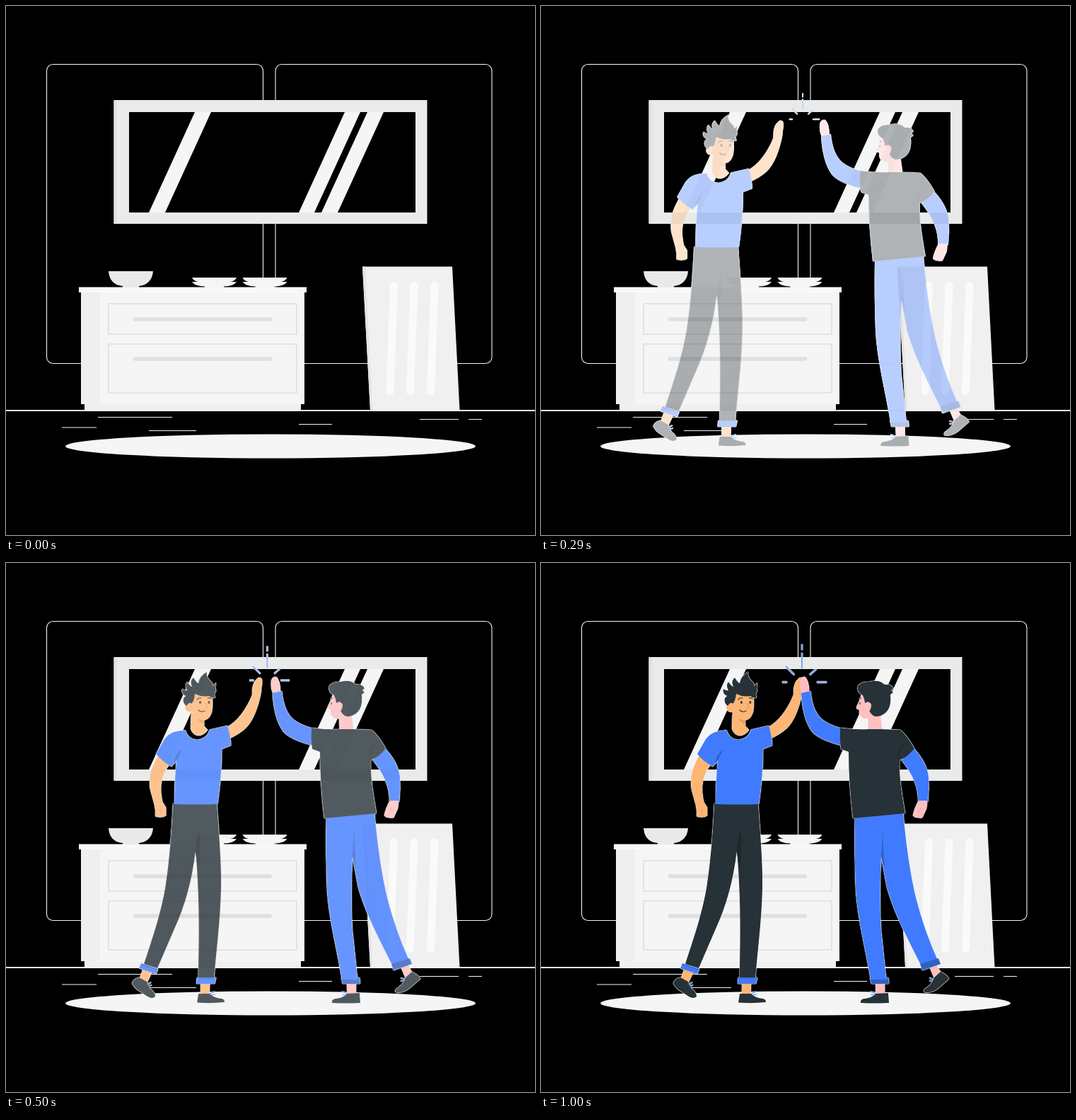
Recreate the animation shown at these times as an HTML page with a canvas. Size 748x748 px, loop 1040 ms.

```html
<!DOCTYPE html>
<html lang="en">
<head>
<meta charset="utf-8">
<title>High five</title>
<style>
html, body { margin: 0; width: 100%; height: 100%; overflow: hidden; background: #000; }
canvas { display: block; }
</style>
</head>
<body>
<canvas id="stage" width="748" height="748"></canvas>
<script>
const SIZE = 748, LOOP = 1040, FPS = 24, SLIDE = 45;
const BLUE = '#407bff', BLUE_DARK = '#315fc4', INK = '#263238', INK_DARK = '#1d272c';
const TAN = '#ffb573', TAN_DARK = '#e8975a', PINK = '#ffbfbf', PINK_DARK = '#f0a3a3';

const stage = document.getElementById('stage').getContext('2d');

function layer() {
  const c = document.createElement('canvas');
  c.width = c.height = SIZE;
  return c.getContext('2d');
}

function fill(g, color, d) {
  g.fillStyle = color;
  g.fill(new Path2D(d));
}

function line(g, color, width, d, cap = 'butt') {
  g.strokeStyle = color;
  g.lineWidth = width;
  g.lineCap = cap;
  g.stroke(new Path2D(d));
}

function box(g, color, x1, y1, x2, y2) {
  g.fillStyle = color;
  g.fillRect(x1, y1, x2 - x1, y2 - y1);
}

function drawRoom(g, wall) {
  box(g, wall, 0, 0, SIZE, SIZE);
  for (const x of [57.5, 381]) {
    g.beginPath();
    g.roundRect(x, 82.5, 306, 423, 9);
    g.strokeStyle = '#f4f4f4';
    g.lineWidth = 1.1;
    g.stroke();
  }

  // mirror
  box(g, '#e9eaea', 152.5, 133, 595.5, 308);
  box(g, '#e1e3e2', 152.5, 134, 157, 307);
  box(g, wall, 174, 150, 579, 292);
  for (const [x, w] of [[267, 23], [479, 22], [511, 23]])
    fill(g, '#f5f5f5', `M${x} 150h${w}l-65 142h-${w}z`);

  // bin
  fill(g, '#f0f0f0', 'M504 368.5H631L641.5 572H515z');
  fill(g, '#e4e4e4', 'M504 368.5h4L518 572h-3z');
  for (const x of [548.5, 577, 606])
    line(g, '#fafafa', 11, `M${x} 395l-5.5 150`, 'round');

  // floor
  line(g, '#f5f5f5', 2, 'M0 572H748');
  line(g, '#f5f5f5', 1.2, 'M130 581.5H235M79 596H128M202 600.5H269M414 591.5H461M585 584.5H640M654 584.5H673');
  fill(g, '#f5f5f5', 'M84 622.5a290 17 0 0 1 580 0a290 17 0 0 1 -580 0');

  // cabinet
  box(g, '#f0f0f0', 111, 563, 417, 572);
  box(g, '#f5f5f5', 106, 405, 422, 563);
  box(g, '#efefef', 106, 405, 133, 563);
  box(g, '#f8f8f8', 103, 397.5, 425, 405);
  line(g, '#e0e0e0', 1.7, 'M145 421H411V464H145zM145 478H411V547H145z');
  line(g, '#e0e0e0', 5.5, 'M182.5 443H373.5M182.5 499H373.5', 'round');

  // dishes
  fill(g, '#e8eae9', 'M145 375H208C207 388 199 395 188 396V398H165V396C153 395 146 388 145 375z');
  for (const x of [263, 334.5])
    fill(g, '#f5f5f5', `M${x} 384h63q-2 5 -9 6h9q-4 6 -18 6.5v1.5h-27v-1.5q-14 -.5 -18 -6.5h9q-7 -1 -9 -6z`);
}

function drawLeftMan(g) {
  // feet
  fill(g, TAN, 'M203 573L198 587L208 594L215 579z');
  fill(g, INK, 'M197 586Q190 587 187 594Q190 601 197 605L209 613Q216 617 220 613Q220 607 213 602L208 592z');
  fill(g, TAN, 'M284 594H297L296 611H284z');
  fill(g, INK, 'M281 609H297Q303 615 314 616Q318 617 318 621Q300 623 279 621.5z');
  line(g, BLUE, 1.2, 'M297 609l7 -3M299 611l6 -1M208 596l6 -3M210 598l5 -1');
  // trousers
  fill(g, INK, 'M245 340H307C310 380 314 430 313 460C312 505 306 550 303 588H281C281 545 284 490 277 406C272 450 261 487 248 515Q235 545 223 573L204 567C214 536 229 494 235 453C240 420 243 380 245 340z');
  fill(g, INK_DARK, 'M282 376L276 405L281 433Q285 400 282 376z');
  fill(g, BLUE, 'M200 566L224 574L221 581L197 573zM279 586H306L304 595H278z');
  line(g, BLUE_DARK, 1, 'M200 567L223 575M280 587H305');
  // arms
  fill(g, TAN, 'M224 272C213 292 211 302 213 320L219 342Q221 350 220 358Q229 361 235 357L235 346L230 338C226 318 227 303 239 286z');
  line(g, TAN_DARK, 1, 'M228 348v7');
  fill(g, TAN, 'M320 233C336 225 349 207 357 187Q357 172 361 167L366 162Q371 161 371 168L369 185C365 204 358 224 347 234Q338 242 323 249z');
  // neck and shirt
  fill(g, BLUE, 'M264 236.5C248 237 240 240 233 249L221 270Q230 281 243 288L250 278Q247 312 247 341Q280 342 308 341Q314 300 314 263L327 258Q326 242 322 230L296 236Q280 248 264 236.5z');
  fill(g, BLUE_DARK, 'M258 263Q248 270 246 285L250 279z');
  g.globalCompositeOperation = 'destination-out';
  fill(g, '#000', 'M262 235Q266 250 280 250Q294 248 297 235z');
  g.globalCompositeOperation = 'source-over';
  fill(g, TAN, 'M271 211L270 234Q273 243 281 244Q289 243 294 236L289 231V218z');
  fill(g, TAN_DARK, 'M278 217Q283 223 289 223V227Q281 226 278 217z');
  // head
  fill(g, TAN, 'M271 183H299Q302 195 300 209Q297 222 287 222Q276 221 272 210Q263 212 262 204Q263 198 271 199z');
  fill(g, INK, 'M264 202Q258 198 260 191L263 188Q256 185 258 178Q262 181 265 180Q261 173 265 168Q269 174 272 175Q268 167 274 162Q278 169 281 170Q282 160 293 154Q291 160 298 167Q302 170 301 174L306 169Q304 176 306 181Q302 185 305 190Q300 192 296 188Q286 190 276 185Q275 195 271 199Q268 196 264 202z');
  fill(g, INK, 'M282 197a1.4 2 0 1 0 2.8 0a1.4 2 0 1 0 -2.8 0zM294.5 197a1.4 2 0 1 0 2.8 0a1.4 2 0 1 0 -2.8 0z');
  line(g, INK, 1.1, 'M279 193q3 -3 6 -2M294 191q3 -1 5 1M281 208q4 4 9 1', 'round');
  line(g, TAN_DARK, 1.2, 'M291 198q4 6 1 8h-2');
}

function drawRightMan(g) {
  // feet
  fill(g, PINK, 'M473 594H486V611H474z');
  fill(g, INK, 'M491 608L492 622Q470 623 452 622Q451 617 457 616Q468 615 473 609z');
  fill(g, PINK, 'M549 570L558 566L567 582L557 589z');
  fill(g, INK, 'M565 578Q574 582 577 588L562 601Q552 609 542 607Q540 603 546 600Q554 594 555 587z');
  line(g, BLUE, 1.2, 'M474 609l-8 -3M473 611l-7 -1M556 588l-7 -1M555 590l-6 1');
  // trousers
  fill(g, BLUE, 'M444 358L512 352C515 385 520 430 530 473Q542 520 561 562L538 570C522 538 499 495 489 458L481 415C479 450 479 505 482 530L488 588H466C459 545 447 500 445 460Q443 410 444 358z');
  fill(g, BLUE_DARK, 'M484 376L481 415L486 432Q483 400 484 376z');
  fill(g, BLUE_DARK, 'M536 567L562 559L565 567L539 576zM465 586H491L492 595H467z');
  line(g, BLUE, 3, 'M466 587.5H490');
  // arms
  fill(g, BLUE, 'M526 261Q546 282 548 303Q549 320 547 338H533Q535 310 510 279z');
  fill(g, PINK, 'M534 336H546L545 347L539 360Q530 361 526 357Q528 347 534 336z');
  line(g, PINK_DARK, 1, 'M537 346l-4 8');
  fill(g, PINK, 'M366 167Q368 160 373 161Q379 166 379 183L370 187Q365 178 366 167z');
  fill(g, BLUE, 'M368 184L381 181C383 200 388 213 397 221Q407 229 425 234V258Q393 250 383 238Q370 220 368 184z');
  // neck and shirt
  fill(g, PINK, 'M462 212L463 239H483L479 210z');
  fill(g, INK, 'M423 233Q445 236 463 235H481L508 236Q517 243 528 262Q519 274 507 279C506 305 511 330 515 354L441 361Q435 310 435 267L424 263Q422 248 423 233z');
  line(g, INK_DARK, 1.2, 'M513 255Q505 263 505 280');
  // head
  fill(g, PINK, 'M454 183Q451 195 446 204Q446 207 450 207Q449 218 457 220Q470 221 475 210V182z');
  fill(g, INK, 'M455 187Q446 183 448 174Q453 167 464 168Q478 164 486 172Q495 171 498 177L495 180L498 183L494 186Q496 204 487 212Q478 219 470 216Q463 211 463 203L458 197Q457 191 455 187z');
  fill(g, PINK, 'M467 200Q462 193 458 199Q457 208 463 210Q467 208 467 200z');
  line(g, INK, 1.2, 'M450 192l3 -1M451 197v3');
}

function drawRays(g) {
  line(g, '#739eff', 1.9, 'M369 115V123M369 127V149M346 146L358 158M389 150L380 158M341 168.5H348M390 168.5H404');
}

function sprite(draw) {
  const g = layer();
  draw(g);
  return g.canvas;
}

const darkRoom = sprite(g => drawRoom(g, '#000'));
const lightRoom = sprite(g => drawRoom(g, '#fff'));
const leftMan = sprite(drawLeftMan);
const rightMan = sprite(drawRightMan);
const rays = sprite(drawRays);
const world = layer(), mask = layer();

const bezier = (s, a, b) => 3 * (1 - s) ** 2 * s * a + 3 * (1 - s) * s * s * b + s ** 3;

// cubic-bezier(.36, -.01, .5, 1.38)
function ease(p) {
  let lo = 0, hi = 1;
  for (let i = 0; i < 24; i++) {
    const mid = (lo + hi) / 2;
    if (bezier(mid, 0.36, 0.5) < p) lo = mid; else hi = mid;
  }
  return bezier(hi, -0.01, 1.38);
}

function drawActors(g, v, dx = 0, dy = 0) {
  const scale = 0.5 + 0.5 * v, slide = SLIDE * (v - 1);
  g.drawImage(leftMan, slide + dx, dy);
  g.drawImage(rightMan, dx - slide, dy);
  g.save();
  g.translate(372.5 + dx, 142 + dy);
  g.scale(scale, scale);
  g.drawImage(rays, -372.5, -142);
  g.restore();
}

function render(ms) {
  // pictures start on 10 ms ticks, 24 a second
  const step = Math.floor((Math.floor(ms / 10) * 10 + 5) * FPS / 1000);
  const v = step ? ease(Math.min(1, (step + 0.75) / FPS)) : 0;
  stage.drawImage(darkRoom, 0, 0);
  if (v <= 0) return;

  // the actors fade over a white room, seen only inside their outlines
  world.globalAlpha = 1;
  world.drawImage(lightRoom, 0, 0);
  world.globalAlpha = Math.min(1, v);
  drawActors(world, v);

  mask.globalCompositeOperation = 'source-over';
  mask.clearRect(0, 0, SIZE, SIZE);
  for (const [dx, dy] of [[0.4, 0], [-0.4, 0], [0, 0.4], [0, -0.4]])
    drawActors(mask, v, dx, dy);
  mask.globalCompositeOperation = 'source-in';
  mask.drawImage(world.canvas, 0, 0);
  stage.drawImage(mask.canvas, 0, 0);
}

const start = performance.now();
function tick() {
  render((performance.now() - start) % LOOP);
  requestAnimationFrame(tick);
}
tick();
</script>
</body>
</html>
```
